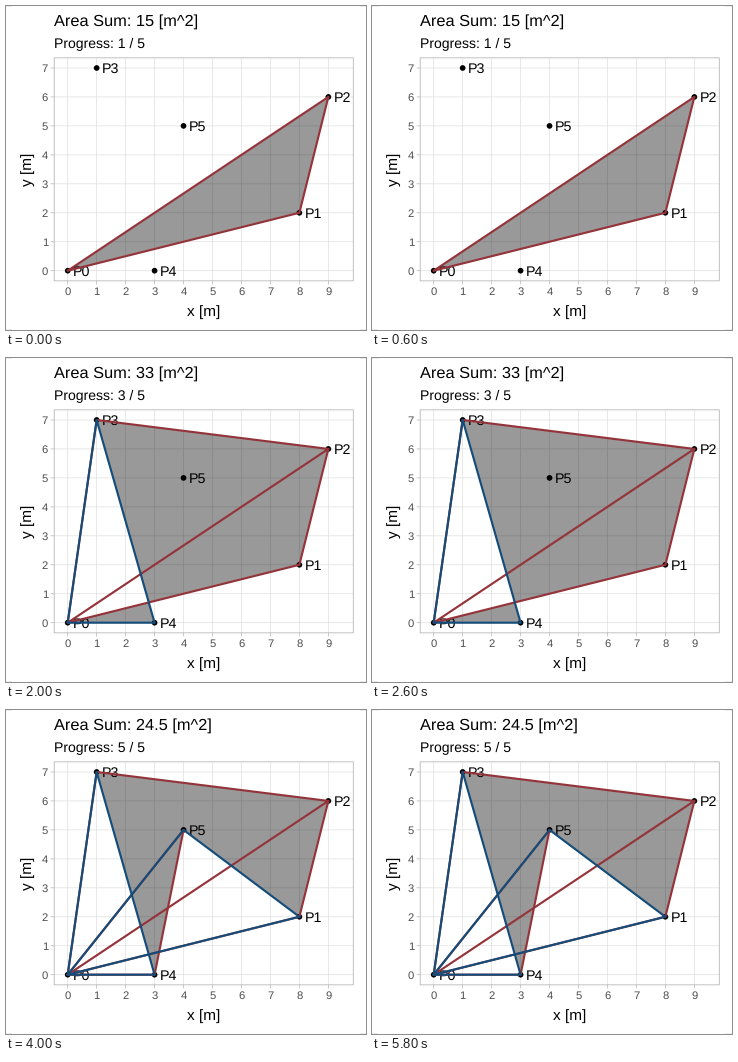
These frames come from a looping animation (360 by 324 pixels, 7000 ms). A matplotlib script:

```python
import matplotlib.pyplot as plt
from matplotlib.animation import FuncAnimation
from matplotlib.patches import Circle, Polygon, Rectangle

plt.rcParams.update({
    "toolbar": "None",
    "font.family": "Liberation Sans",
    "text.hinting": "none",
})

W, H = 360, 324
UNIT = 28.96
X0, Y0 = 61.7, 264.7
LEFT, RIGHT = 48.2, 347.3
TOP, BOTTOM = Y0 - 7.35 * UNIT, Y0 + 0.35 * UNIT

POINTS = [(0, 0), (8, 2), (9, 6), (1, 7), (3, 0), (4, 5)]
LOOP = [1, 2, 3, 4, 5, 1]
STEPS = len(LOOP) - 1
RED, BLUE = "#94343a", "#154c79"
GRID, EDGE, TICK = "#dedede", "#b3b3b3", "#4d4d4d"

fig = plt.figure(figsize=(W / 72, H / 72), dpi=72, facecolor="white")
ax = fig.add_axes([0, 0, 1, 1])
ax.set_xlim(0, W)
ax.set_ylim(H, 0)
ax.axis("off")


def to_px(p):
    return X0 + UNIT * p[0], Y0 - UNIT * p[1]


def line(x1, y1, x2, y2, color, width, z, cap="butt"):
    return ax.plot([x1, x2], [y1, y2], color=color, lw=width, zorder=z,
                   solid_capstyle=cap, snap=False)[0]


def label(x, y, text, size, color="black", **kw):
    kw.setdefault("va", "baseline")
    return ax.text(x, y, text, size=size, color=color, **kw)


def signed_area(a, b):
    (xa, ya), (xb, yb) = POINTS[a], POINTS[b]
    return (xa * yb - xb * ya) / 2


def draw_panel():
    for i in range(10):
        x = X0 + UNIT * i
        line(x, TOP, x, BOTTOM, GRID, 0.68, 1)
        line(x, BOTTOM, x, BOTTOM + 3.5, EDGE, 0.68, 1)
        label(x, 289, str(i), 11.2, TICK, ha="center")
    for i in range(8):
        y = Y0 - UNIT * i
        line(LEFT, y, RIGHT, y, GRID, 0.68, 1)
        line(LEFT - 3.5, y, LEFT, y, EDGE, 0.68, 1)
        label(41.9, round(y + 4), str(i), 11.2, TICK, ha="right")
    ax.add_patch(Rectangle((LEFT, TOP), RIGHT - LEFT, BOTTOM - TOP, fill=False,
                           ec=EDGE, lw=0.8, snap=False, zorder=8))
    label((LEFT + RIGHT) / 2, 310, "x [m]", 15.4, ha="center")
    label(25.4, (TOP + BOTTOM) / 2, "y [m]", 15.4, rotation=90,
          ha="center", rotation_mode="anchor")
    # faint page edge beside the plot area
    for x in (0, W - 6):
        for y in (0, H - 1):
            ax.add_patch(Rectangle((x, y), 6, 1, fc="#ebebeb", lw=0))


def draw_points():
    for i, p in enumerate(POINTS):
        x, y = to_px(p)
        ax.add_patch(Circle((x, y), 2.85, fc="black", lw=0, zorder=2))
        label(x + 5.3, y + 5.2, f"P{i}", 14.2, zorder=3)


def build_edges():
    """One line per distinct coloured edge, grouped by the step that adds it."""
    seen, steps = set(), []
    for a, b in zip(LOOP, LOOP[1:]):
        color, z = (RED, 5) if signed_area(a, b) > 0 else (BLUE, 6)
        lines = []
        for i, j in ((0, a), (a, b), (b, 0)):
            key = (color, min(i, j), max(i, j))
            if key not in seen:
                seen.add(key)
                lines.append(line(*to_px(POINTS[i]), *to_px(POINTS[j]),
                                  color, 2.13, z, cap="round"))
        steps.append(lines)
    return steps


draw_panel()
draw_points()
title = label(48.2, 19.3, "", 16.35)
progress = label(48.2, 42, "", 14)

region = Polygon([(0, 0)] * 3, closed=True, fc="black", alpha=0.4, lw=0, zorder=4)
ax.add_patch(region)

areas = [signed_area(a, b) for a, b in zip(LOOP, LOOP[1:])]
edges = build_edges()


def update(second):
    n = min(second + 1, STEPS)
    title.set_text(f"Area Sum: {sum(areas[:n]):g} [m^2]")
    progress.set_text(f"Progress: {n} / {STEPS}")
    region.set_xy([to_px(POINTS[k]) for k in [0] + LOOP[:n + 1]])
    for i, lines in enumerate(edges):
        for edge in lines:
            edge.set_visible(i < n)
    return [title, progress, region]


anim = FuncAnimation(fig, update, frames=7, interval=1000, repeat=True,
                     repeat_delay=0, blit=False)
plt.show()
```
